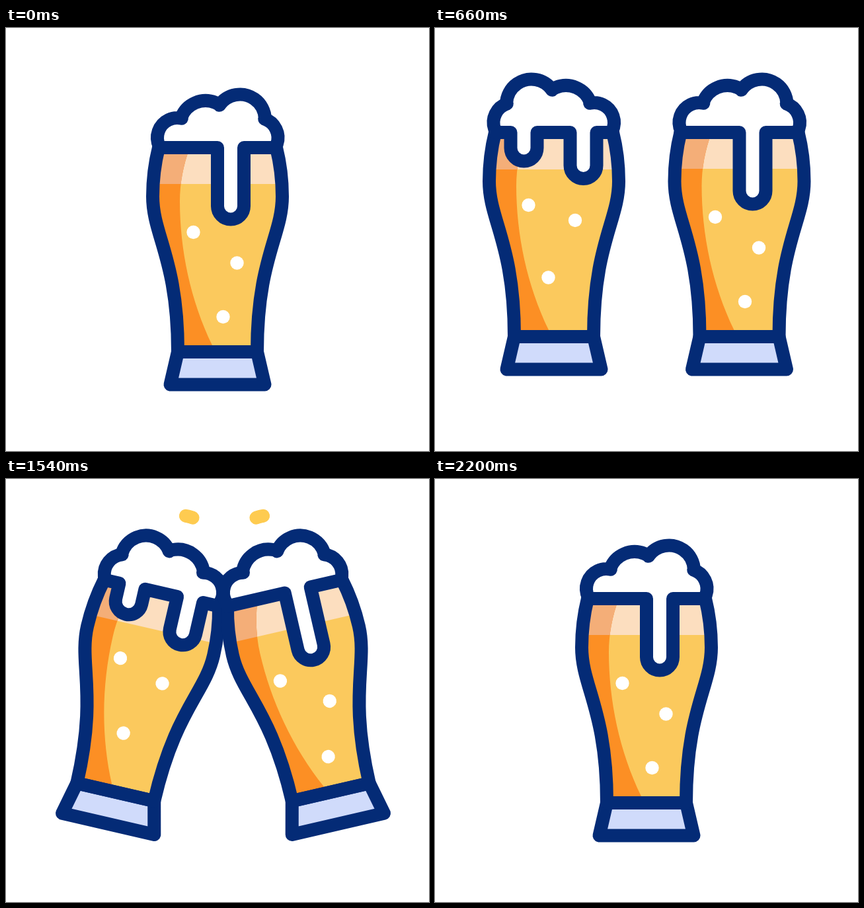
Animation, 640 px wide and 640 px high, one loop 2.4 s. Source, as an HTML page with a canvas:

```html
<!DOCTYPE html>
<html lang="en">
<head>
<meta charset="utf-8">
<title>Cheers</title>
<style>
html, body { margin: 0; width: 100%; height: 100%; overflow: hidden; background: #fff; }
canvas { display: block; width: 100vw; height: 100vh; }
</style>
</head>
<body>
<canvas id="stage" width="640" height="640"></canvas>
<script>
const ctx = document.getElementById('stage').getContext('2d');
const LOOP = 2400, STEP = 20, MID = 320, RIM = 181;
const NAVY = '#042b76', BEER = '#fbc95d', AMBER = '#fc8f24', FROTH = '#fcdebf',
      FROTH_SHADE = '#f4ae78', BASE = '#d0dbfb', SPARK = '#fecb50';

const rightGlass = {
  drips: [[340, 269.5]],
  bubbles: [[283.5, 309], [349.5, 355.5], [328.5, 437]],
  level: 236
};
// Drips of a flipped glass are given before the flip.
const leftGlass = {
  flip: true,
  drips: [[365.5, 204.5], [275.5, 231]],
  bubbles: [[281.5, 291], [352, 314], [311.5, 400.5]],
  level: 237
};

const body = new Path2D('M231 181C225 205 222 230 222 255C222 314 260 350 260 490' +
  'H380C380 350 418 314 418 255C418 230 415 205 409 181Z');
const sides = new Path2D('M231 181C225 205 222 230 222 255C222 314 260 350 260 490' +
  'H380C380 350 418 314 418 255C418 230 415 205 409 181');
const shade = new Path2D('M200 181H278C268 208 263 235 263 262C263 335 279 412 312 480L317 490H200Z');
const foot = new Path2D('M260 490L248.5 539.5H391.5L380 490Z');

rightGlass.foam = foamPath(rightGlass.drips);
leftGlass.foam = foamPath(leftGlass.drips);

function foamPath(drips) {
  const path = new Path2D();
  const bump = (cx, cy, r, x0, y0, x1, y1) =>
    path.arc(cx, cy, r, Math.atan2(y0 - cy, x0 - cx), Math.atan2(y1 - cy, x1 - cx));
  path.moveTo(231, RIM);
  bump(259, 166, 30, 232, 179, 266, 136);
  bump(302, 149.5, 39.5, 266, 135, 323, 117);
  bump(354, 138.5, 38, 323, 117, 391, 138);
  bump(381.5, 166, 30, 391, 138, 408, 179);
  path.lineTo(409, RIM);
  // The lower edge runs from right to left.
  for (const [x, y] of [...drips].sort((a, b) => b[0] - a[0])) {
    path.lineTo(x + 20, RIM);
    path.lineTo(x + 20, y);
    path.arc(x, y, 20, 0, Math.PI);
    path.lineTo(x - 20, RIM);
  }
  path.closePath();
  return path;
}

function fill(path, color) {
  ctx.fillStyle = color;
  ctx.fill(path);
}

function band(color, level) {
  ctx.fillStyle = color;
  ctx.fillRect(200, RIM, 240, level - RIM);
}

function drawGlass(glass, x, y, angle) {
  ctx.save();
  ctx.translate(x, y);
  ctx.rotate(angle);
  ctx.translate(-MID, -MID);

  ctx.save();
  ctx.clip(body);
  fill(body, BEER);
  band(FROTH, glass.level);
  fill(shade, AMBER);
  ctx.clip(shade);
  band(FROTH_SHADE, glass.level);
  ctx.restore();

  ctx.fillStyle = '#fff';
  for (const [bx, by] of glass.bubbles) {
    ctx.beginPath();
    ctx.arc(bx, by, 10.2, 0, Math.PI * 2);
    ctx.fill();
  }

  ctx.strokeStyle = NAVY;
  ctx.lineWidth = 20;
  ctx.lineCap = ctx.lineJoin = 'round';
  fill(foot, BASE);
  ctx.stroke(foot);
  ctx.stroke(sides);
  if (glass.flip) {
    ctx.translate(2 * MID, 0);
    ctx.scale(-1, 1);
  }
  fill(glass.foam, '#fff');
  ctx.stroke(glass.foam);
  ctx.restore();
}

const clamp = v => Math.min(1, Math.max(0, v));
const span = (t, a, b) => clamp((t - a) / (b - a));
const ease = (t, a, b) => {
  const p = span(t, a, b);
  return p * p * (3 - 2 * p);
};

const bezier = (u, a, b, c, d) => {
  const v = 1 - u;
  return v * v * v * a + 3 * v * v * u * b + 3 * v * u * u * c + u * u * u * d;
};

function drawSparks(t) {
  if (t <= 1180 || t >= 1620) return;
  const head = Math.pow(span(t, 1180, 1600), 0.45);
  const tail = span(t, 1220, 1620);
  ctx.strokeStyle = SPARK;
  ctx.lineWidth = 20;
  ctx.lineCap = ctx.lineJoin = 'round';
  for (const side of [-1, 1]) {
    ctx.beginPath();
    for (let i = 0; i <= 24; i++) {
      const u = tail + (head - tail) * i / 24;
      const reach = 330.5 - bezier(u, 316, 315, 296, 266);
      ctx.lineTo(330.5 + side * reach, bezier(u, 118, 76, 58, 55));
    }
    ctx.stroke();
  }
}

function draw(t) {
  ctx.fillStyle = '#fff';
  ctx.fillRect(0, 0, 640, 640);

  const apart = ease(t, 200, 600) - ease(t, 1800, 2200);
  const clink = ease(t, 1000, 1180) - ease(t, 1600, 1800);
  const dip = ease(t, 1020, 1180) - ease(t, 1180, 1380);
  const tilt = clink * 13 * Math.PI / 180;
  const y = MID - 23 * apart + 11 * clink + 31 * dip;

  drawSparks(t);
  drawGlass(leftGlass, MID - 450 + 310 * apart + 24 * clink, y, tilt);
  drawGlass(rightGlass, MID + 140.5 * apart - 7.5 * clink, y, -tilt);
}

const start = performance.now();
function tick() {
  const t = (performance.now() - start) % LOOP;
  draw(Math.floor(t / STEP) * STEP);
  requestAnimationFrame(tick);
}
tick();
</script>
</body>
</html>
```
